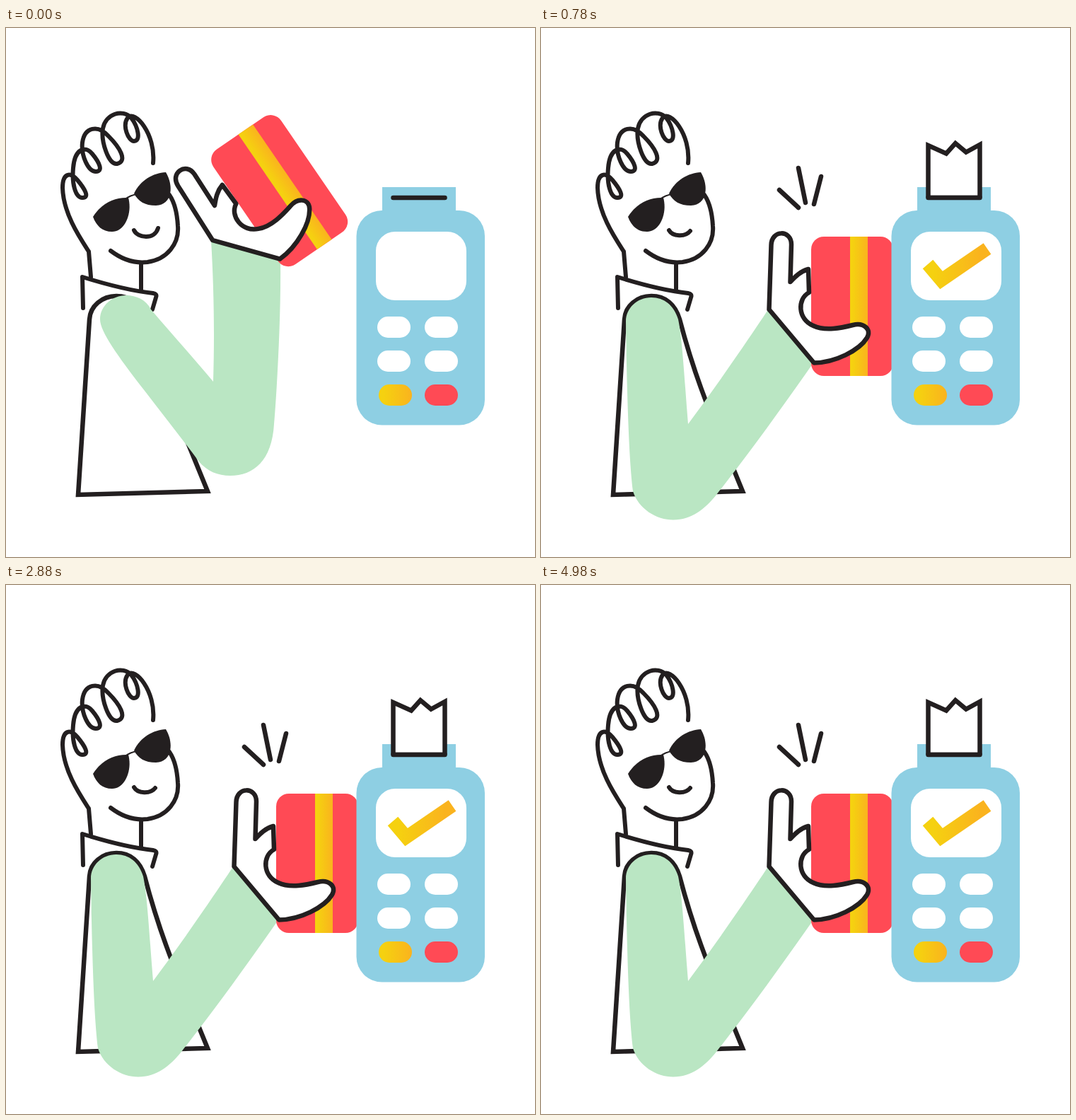
Animation, 748 px wide and 748 px high, one loop 6300 ms. Source, as an HTML page:

```html
<!DOCTYPE html>
<html lang="en">
<head>
<meta charset="utf-8">
<title>Card payment</title>
<style>
  html, body { margin: 0; width: 100%; height: 100%; overflow: hidden; background: #fff; }
  svg { display: block; width: 100%; height: 100%; }
  .ink { fill: none; stroke: #231f20; stroke-width: 6.5; }
  .round { stroke-linecap: round; stroke-linejoin: round; }
  .dark { fill: #231f20; }
  .white { fill: #fff; }
  .red { fill: #ff4a55; }
  .blue { fill: #8ecfe3; }
  #head { stroke-width: 6; }
  #head .bridge { stroke-width: 2; }
  .filled { fill: #fff; }
</style>
</head>
<body>
<svg viewBox="0 0 748 748">
  <defs>
    <linearGradient id="gold">
      <stop offset=".15" stop-color="#f5d110"/>
      <stop offset="1" stop-color="#fab31e"/>
    </linearGradient>
    <linearGradient id="goldTick" gradientUnits="userSpaceOnUse" x1="540" y1="0" x2="636" y2="0">
      <stop offset=".15" stop-color="#f5d110"/>
      <stop offset=".85" stop-color="#fab31e"/>
    </linearGradient>
    <clipPath id="aboveSlot"><rect x="530" y="140" width="110" height="100"/></clipPath>
  </defs>

  <g id="head" class="ink round">
    <path d="M120 352L117 316C104 296 81 262 80 226C80 205 91 203 101 215C111 227 119 240 108 240
      C98 240 93 220 95 198C97 172 111 165 122 178C132 190 138 203 127 203C116 203 106 180 108 162
      C111 140 130 136 145 153C160 168 173 188 157 192C145 194 134 160 137 142C141 121 165 114 177 127
      C187 140 191 160 181 160C173 160 164 138 172 127C182 115 212 150 208 191"/>
    <path d="M148 315C165 328 183 333 200 331C228 327 245 305 243 280C242 262 238 246 231 236"/>
    <path d="M191 333V370"/>
    <path id="smile"/>
    <path d="M109 396L108 352C140 362 180 372 208 375Q214 376 212 381L207 398"/>
    <path class="bridge" d="M167 243Q176 236 186 235"/>
  </g>
  <path class="dark" d="M123 267C135 248 153 239 173 240C179 262 168 288 150 288C136 288 128 280 123 267Z"/>
  <path class="dark" d="M181 234C190 215 208 205 226 204C237 222 236 250 212 251C196 251 187 245 181 234Z"/>

  <path class="ink" d="M102 660L118 412C119 393 136 379 156 379C176 379 190 391 196 412
    C206 450 222 500 238 540L285 655Z"/>

  <path id="arm" fill="#bae6c3"/>
  <g id="hand">
    <rect class="red" x="382" y="295" width="116" height="197" rx="18"/>
    <rect x="437" y="295" width="25" height="197" fill="url(#gold)"/>
    <path class="ink round filled" d="M322.500 398L325.500 307C326 285 354 285 354 306L352.500 359
      C360 351 367 344 378 341L379 374C362 383 363 412 385 421C402 429 425 424 441 420
      C456 416 468 426 461 438C450 456 416 473 386 473.500Z"/>
  </g>
  <g id="snap" class="ink round">
    <path pathLength="1" d="M364 254L337 229"/>
    <path pathLength="1" d="M374 247L364 198"/>
    <path pathLength="1" d="M386 249L396 210"/>
  </g>

  <g id="terminal">
    <rect class="blue" x="532" y="225" width="104" height="33"/>
    <rect class="blue" x="495.500" y="258" width="181.500" height="303.500" rx="36"/>
    <rect class="white" x="523" y="288" width="128" height="97" rx="27"/>
    <rect class="white" x="525" y="408" width="47" height="30" rx="15"/>
    <rect class="white" x="592" y="408" width="47" height="30" rx="15"/>
    <rect class="white" x="525" y="456" width="47" height="30" rx="15"/>
    <rect class="white" x="592" y="456" width="47" height="30" rx="15"/>
    <rect x="527" y="504" width="47" height="30" rx="15" fill="url(#gold)"/>
    <rect class="red" x="592" y="504" width="47" height="30" rx="15"/>
    <path id="tick" pathLength="1" d="M547 334L566 356.5L631 312" fill="none"
      stroke="url(#goldTick)" stroke-width="19"/>
    <g clip-path="url(#aboveSlot)">
      <path id="paper" class="ink filled"
        d="M547.500 240V166L573 177.500L586 163L601 175.500L620.500 165V240Z"/>
    </g>
    <path class="ink round" d="M547.500 240H620.500"/>
  </g>
</svg>
<script>
const LOOP = 6300, STEP = 30;
// start of each tap: reset, arm swing, terminal reply
const taps = [[0, 120, 540], [2160, 2250, 2640], [4230, 4350, 4740]];
const swing = [0, 0.08, 0.29, 0.56, 0.814, 0.96, 1];
const MID = 0.814;

// arm outline raised, passing MID, and lowered
const armPoses = [
  "M133 412C133 440 200 515 272 612C284 627 300 633 317 633C350 633 376 612 379 560C384 500 389 400 388 328L290 301C294 365 295 435 293 500C265 466 232 430 205 398C198 384 184 378 170 378C150 378 133 393 133 412Z",
  "M122 415C128 480 145 600 160 655C168 676 190 690 214 690C237 690 256 672 270 652C310 590 355 515 391 447L321 379C300 430 260 495 226 553C220 505 212 445 196 414C190 393 175 381 157 381C138 381 121 397 122 415Z",
  "M120 415C121 480 123 600 130 655C138 680 163 695.5 187 695.5C213 695.5 232 680 248 660C290 607 335 545 384 475L322 397C300 430 260 490 208 560C203 500 200 440 194 412C188 392 174 381 156 381C136 381 120 396 120 415Z"
].map(d => d.match(/[A-Z]|[\d.]+/g));
const wrist = { x: [291.3, 321, 322], y: [299.7, 379, 397] };

const el = id => document.getElementById(id);
const arm = el("arm"), hand = el("hand"), smile = el("smile"), tick = el("tick"), paper = el("paper");
const snapLines = [...el("snap").children];
const clamp = v => Math.min(1, Math.max(0, v));
const stepsSince = (t, start) => Math.max(0, Math.floor((t - start) / STEP) + 1);

// smooth curve through three values at 0, MID and 1
function through([a, b, c], p) {
  const bump = p * (1 - p) / (MID * (1 - MID));
  return a + (c - a) * p + (b - a - (c - a) * MID) * bump;
}

function show(node, p) {
  node.style.visibility = p > 0 ? "visible" : "hidden";
}

function trim(node, p) {
  show(node, p);
  node.setAttribute("stroke-dasharray", p < 1 ? `${p} 2` : "none");
}

function poseArm(p) {
  const d = armPoses[0].map((v, i) =>
    isNaN(v) ? v : through(armPoses.map(pose => +pose[i]), p).toFixed(2));
  arm.setAttribute("d", d.join(" "));
  const x = through(wrist.x, p), y = through(wrist.y, p);
  hand.setAttribute("transform",
    `translate(${x} ${y}) rotate(${-34.4 * (1 - p)}) translate(-322 -397)`);
}

function poseSmile(p) {
  smile.setAttribute("d",
    `M181 286C186 ${297 - 2 * p} ${210 - 6 * p} ${300 - 4 * p} ${215 - 4 * p} ${283 + 4 * p}`);
}

function draw(time) {
  const t = time % LOOP;
  const [, armStart, replyStart] = taps.filter(tap => tap[0] <= t).pop();
  const a = stepsSince(t, armStart), r = stepsSince(t, replyStart);
  const flick = clamp((a - 5) / 5);

  poseArm(swing[Math.min(a, swing.length - 1)]);
  poseSmile(flick);
  snapLines.forEach(line => trim(line, flick));

  trim(tick, clamp(r / 5));
  const rise = clamp((r - 5) / 4);
  show(paper, rise);
  paper.setAttribute("transform", `translate(0 ${78 * (1 - rise)})`);
}

const begin = performance.now();
function tickFrame() {
  draw(performance.now() - begin);
  requestAnimationFrame(tickFrame);
}
tickFrame();
</script>
</body>
</html>
```
